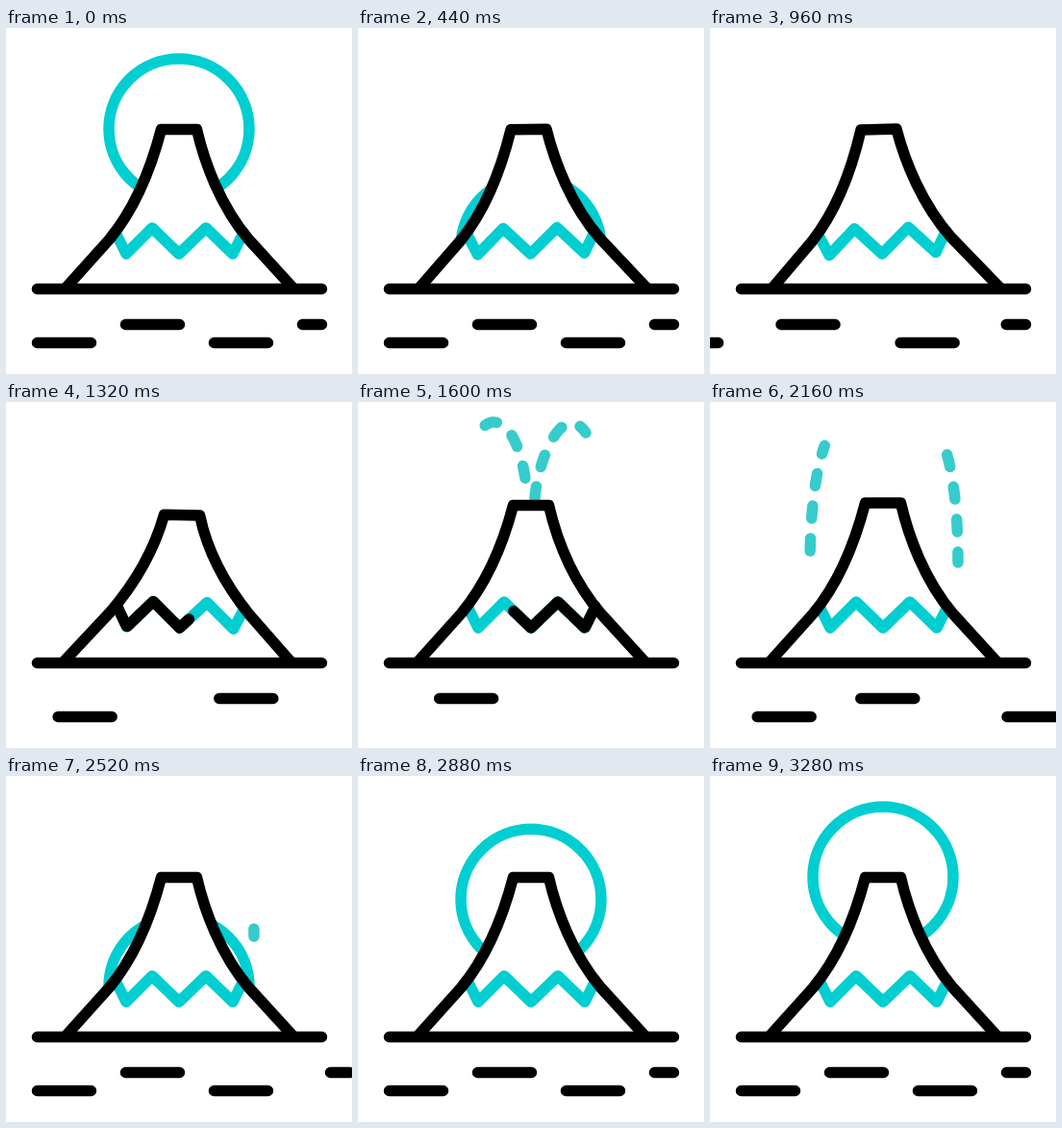
Animation of 360 by 360 pixels, one loop 3640 ms. Source, as an HTML page:

```html
<!DOCTYPE html>
<html lang="en">
<head>
<meta charset="utf-8">
<title>Volcano</title>
<style>
  html, body { margin: 0; width: 100%; height: 100%; overflow: hidden; background: #fff; }
  svg { display: block; width: 100vw; height: 100vh; }
  path, circle { fill: none; stroke: #000; stroke-width: 11.5; stroke-linecap: round; stroke-linejoin: round; }
  .teal { stroke: #00ced1; }
  .drop { stroke: #36cccb; }
  #body { fill: #fff; stroke: none; }
</style>
</head>
<body>
<svg viewBox="0 0 360 360">
  <clipPath id="sky"><rect width="360" height="272"/></clipPath>
  <g clip-path="url(#sky)">
    <circle id="sun" class="teal" cx="180" r="73"/>
    <path id="dropL" class="drop"/>
    <path id="dropR" class="drop"/>
    <g id="hill">
      <path id="body"/>
      <path id="snow" class="teal" d="M114 213L125 235L152 208L180 235L208 208L236 235L247 213"/>
      <path id="lava"/>
      <path id="edge"/>
    </g>
  </g>
  <path d="M32.5 271.5H328.5"/>
  <path id="water"/>
</svg>
<script>
const LOOP = 3640, STEP = 40, REST = 3280;
const $ = id => document.getElementById(id);
const ramp = (t, a, b) => Math.max(0, Math.min(1, (t - a) / (b - a)));
const wave = (t, period) => Math.cos(2 * Math.PI * t / period);

function curve(d) {
  const p = document.createElementNS("http://www.w3.org/2000/svg", "path");
  p.setAttribute("d", d);
  return { p, len: p.getTotalLength() };
}

// Part of a curve between two lengths.
function part({ p }, a, b) {
  if (b <= a) return "";
  const n = Math.ceil((b - a) / 1.5), pts = [];
  for (let i = 0; i <= n; i++) {
    const q = p.getPointAtLength(a + (b - a) * i / n);
    pts.push(q.x.toFixed(2) + " " + q.y.toFixed(2));
  }
  return "M" + pts.join("L");
}

const snow = curve($("snow").getAttribute("d"));
const left = curve("M176 100C174 60 161 21 141 21C117 21 104 90 104 169");
const right = curve("M184 100C186 70 203 22 222 22C247 22 258 90 258 167");

// Dashes sit still on the curve; the window from..to moves along it.
function drops(c, last, from, to) {
  const dash = 13, period = 34;
  let d = "";
  for (let s = c.len - last; s > -dash; s -= period)
    d += part(c, Math.max(s, from * c.len, 0), Math.min(s + dash, to * c.len));
  return d;
}

function sunY(t) {
  const drop = t < 1400 ? 123 * (t / 440) ** 2 : 341 * (1 - ramp(t, 2090, 3264)) ** 2.4;
  return 105 + Math.min(300, drop);
}

// Shaking around the foot of the hill, before the eruption.
function tilt(t) {
  return -1.6 * wave(t - 960, 582) * ramp(t, 300, 500) * (1 - ramp(t, 1320, 1480));
}

// The top is pressed down, then springs back.
function sink(t) {
  const u = t - 1320;
  return u < 0 ? 6 * (1 - wave(ramp(t, 1120, 1320), 2)) : 12 * Math.exp(-u / 250) * wave(u, 240);
}

// Distance after speeding up to a steady pace.
function run(t) {
  const accel = .0006, top = 410;
  if (t < 0) return 0;
  return accel * (t < top ? t * t : top * (2 * t - top));
}

function water(t) {
  let d = "";
  for (let i = 0; i < 4; i++) {
    const out = 595 + 55 * i + 20 * i * i;
    const home = 2300 + 15 * i + 40 * i * i;
    const shift = t < home - 700 ? -run(t - out) : .00085 * Math.max(0, home - t) ** 2;
    const x = 32.5 + 92 * i + shift;
    const end = Math.min(x + 56, 328.5 + Math.max(0, shift));
    d += `M${x} ${i % 2 ? 308.5 : 327.5}H${end}`;
  }
  return d;
}

function draw(t) {
  $("sun").setAttribute("cy", sunY(t));

  const dy = sink(t), top = 105.5 + dy, mid = 140 + dy;
  const hill = `M45 289.5L107.5 220C136.5 185 152.5 ${mid} 161.5 ${top}H198.5` +
    `C206.5 ${mid} 223 185 252.5 220L316 289.5`;
  $("body").setAttribute("d", hill);
  $("edge").setAttribute("d", hill);
  $("hill").setAttribute("transform", `rotate(${tilt(t)} 180 268)`);

  $("lava").setAttribute("d", part(snow, snow.len * ramp(t, 1480, 1800), snow.len * ramp(t, 1120, 1475)));

  const from = ramp(t, 1770, 2545), to = ramp(t, 1360, 1900);
  $("dropL").setAttribute("d", drops(left, 27, from, to));
  $("dropR").setAttribute("d", drops(right, 11, from, to));

  $("water").setAttribute("d", water(t));
}

const start = performance.now();
function frame() {
  const t = Math.max(0, performance.now() - start) % LOOP;
  draw(Math.min(REST, Math.floor(t / STEP) * STEP));
  requestAnimationFrame(frame);
}
frame();
</script>
</body>
</html>
```
